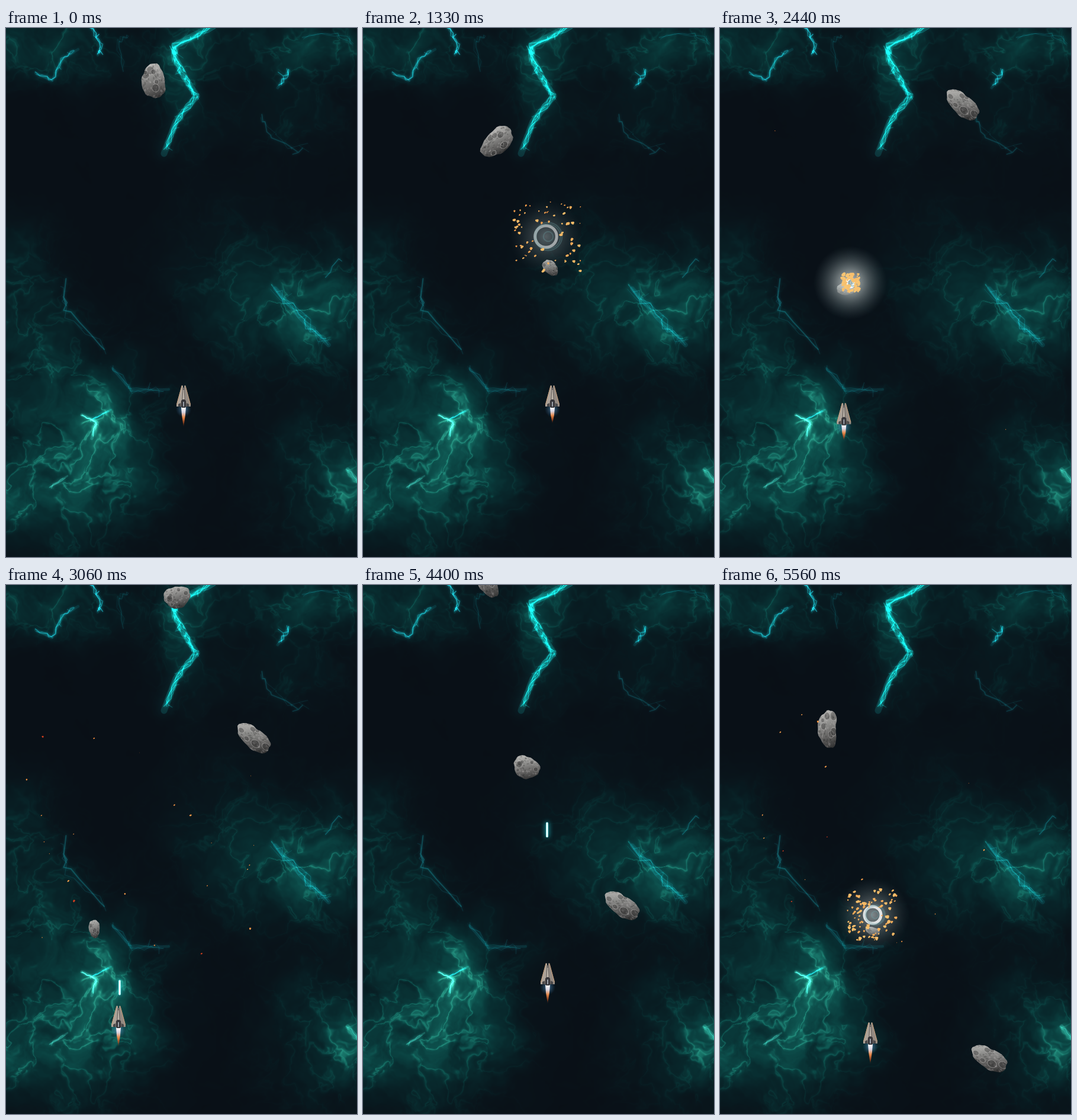
An HTML page with a canvas that plays this animation: 593 by 893 pixels, repeating every 5.59 s.

```html
<!DOCTYPE html>
<html lang="en">
<head>
<meta charset="utf-8">
<title>Asteroid shooter</title>
<style>
html, body { margin: 0; width: 100%; height: 100%; overflow: hidden; background: #09111a; }
canvas { display: block; }
</style>
</head>
<body>
<canvas id="stage" width="593" height="893"></canvas>
<script>
const W = 593, H = 893, LOOP = 5590, TAU = Math.PI * 2;
const stage = document.getElementById('stage');
const ctx = stage.getContext('2d');
const clamp = (v, lo, hi) => Math.min(hi, Math.max(lo, v));
const mix = (a, b, k) => a + (b - a) * k;

function random(seed) {
  return () => {
    seed = (seed + 0x6D2B79F5) | 0;
    let t = Math.imul(seed ^ (seed >>> 15), 1 | seed);
    t = (t + Math.imul(t ^ (t >>> 7), 61 | t)) ^ t;
    return ((t ^ (t >>> 14)) >>> 0) / 4294967296;
  };
}

// ---------- Nebula ----------
const lattice = Float32Array.from({ length: 65536 }, random(11));

function noise(x, y) {
  const xi = Math.floor(x), yi = Math.floor(y);
  let u = x - xi, v = y - yi;
  u *= u * (3 - 2 * u);
  v *= v * (3 - 2 * v);
  const x0 = xi & 255, x1 = (xi + 1) & 255, y0 = (yi & 255) << 8, y1 = ((yi + 1) & 255) << 8;
  return mix(mix(lattice[y0 + x0], lattice[y0 + x1], u), mix(lattice[y1 + x0], lattice[y1 + x1], u), v);
}

function fbm(x, y, octaves) {
  let sum = 0, amp = 0.5;
  for (let i = 0; i < octaves; i++, amp /= 2) {
    sum += amp * noise(x, y);
    x = x * 2.03 + 17;
    y = y * 2.03 + 31;
  }
  return sum;
}

// x, y, radius x, radius y, strength
const clouds = [
  [50, 25, 115, 48, .34], [300, 70, 42, 95, .26], [520, 25, 110, 48, .32],
  [480, 150, 75, 55, .12], [510, 485, 85, 65, .35], [565, 425, 65, 70, .15],
  [390, 430, 85, 95, .18], [15, 440, 60, 75, .23], [60, 560, 95, 65, .24],
  [150, 650, 95, 60, .32], [60, 770, 115, 85, .42], [0, 815, 35, 40, .26],
  [180, 750, 60, 75, .2], [585, 775, 32, 50, .36], [530, 760, 80, 110, .2]
];

function paintClouds(g) {
  const img = g.createImageData(W, H), px = img.data;
  for (let y = 0, p = 0; y < H; y++) {
    for (let x = 0; x < W; x++, p += 4) {
      const dx = fbm(x / 55, y / 55, 4) - .47, dy = fbm(x / 55 + 90, y / 55 + 40, 4) - .47;
      const wx = x + dx * 75, wy = y + dy * 75;
      let d = 0;
      for (const c of clouds) {
        const a = (wx - c[0]) / c[2], b = (wy - c[1]) / c[3], q = a * a + b * b;
        if (q < 6) d += c[4] * Math.exp(-q * .75);
      }
      const n = fbm(wx / 42 + 7, wy / 42 + 60, 5);
      const ridge = 1 - Math.abs(2 * fbm(wx / 38 + 120, wy / 38 + 9, 4) - .95);
      const v = d * (.35 + 1.15 * n + .8 * Math.pow(ridge, 14)) + .02 * n;
      px[p] = 9 - 6 * Math.min(v, .4) + 50 * v * v * v;
      px[p + 1] = 15 + 86 * v + 80 * v * v;
      px[p + 2] = 22 + 78 * v + 55 * v * v;
      px[p + 3] = 255;
    }
  }
  g.putImageData(img, 0, 0);
}

// A jagged thread through "x,y x,y ..." with short side branches
function bolt(g, path, strands, spread, color, alpha, glow) {
  const points = path.split(' ').map(p => p.split(',').map(Number));
  const rnd = random(points[0][0] * 7 + points[0][1]);
  const off = s => (rnd() - .5) * 2 * s;
  g.save();
  g.globalCompositeOperation = 'lighter';
  g.strokeStyle = g.shadowColor = color;
  g.lineCap = g.lineJoin = 'round';
  if (glow) {
    g.globalAlpha = .16;
    g.shadowBlur = glow;
    g.lineWidth = glow * .55;
    g.beginPath();
    points.forEach(p => g.lineTo(p[0], p[1]));
    g.stroke();
  }
  g.shadowBlur = 4;
  for (let k = 0; k < strands; k++) {
    g.globalAlpha = alpha * (.4 + .6 * rnd());
    g.lineWidth = .5 + rnd() * (k ? .8 : 1.6);
    g.beginPath();
    for (let i = 1; i < points.length; i++) {
      const [ax, ay] = points[i - 1], [bx, by] = points[i];
      for (let s = 0; s < 5; s++) {
        const x = mix(ax, bx, s / 5) + off(spread), y = mix(ay, by, s / 5) + off(spread);
        g.lineTo(x, y);
        if (rnd() < .16) {
          g.lineTo(x + off(spread * 2.5), y + off(spread * 2));
          g.moveTo(x, y);
        }
      }
    }
    g.stroke();
  }
  g.restore();
}

function makeSky() {
  const c = document.createElement('canvas');
  c.width = W;
  c.height = H;
  const g = c.getContext('2d');
  paintClouds(g);
  const cyan = '#16b5ae', dim = '#11757c', pale = '#4bc4ac';
  bolt(g, '350,-4 285,30 285,50 301,82', 9, 5, cyan, .5, 22);
  bolt(g, '301,82 322,115 287,158 267,212', 9, 5, cyan, .42, 20);
  bolt(g, '50,76 78,89 95,52 122,36', 2, 3, dim, .8, 8);
  bolt(g, '143,-2 162,30 155,46', 2, 3, dim, .8, 7);
  bolt(g, '208,10 188,22 204,82', 2, 4, dim, .35, 0);
  bolt(g, '500,15 560,12 592,28', 2, 5, dim, .4, 0);
  bolt(g, '478,72 459,101', 3, 4, dim, .65, 9);
  bolt(g, '432,145 455,185 520,216', 2, 7, dim, .3, 0);
  bolt(g, '455,440 500,492 545,535', 4, 9, dim, .45, 14);
  bolt(g, '540,422 568,380', 2, 3, dim, .4, 0);
  bolt(g, '95,430 103,485 190,560', 2, 7, dim, .4, 0);
  bolt(g, '180,575 212,612 275,610', 3, 6, dim, .45, 8);
  bolt(g, '128,653 153,665 145,693', 3, 2, pale, .55, 9);
  bolt(g, '147,660 178,644', 2, 2, dim, .7, 5);
  bolt(g, '75,775 104,756', 2, 2, pale, .35, 5);
  bolt(g, '577,745 597,768', 2, 3, pale, .3, 12);
  return c;
}

// ---------- Actors ----------
// from time, to time, x, y, to x, to y, length, width, angle, turn
const rocks = [
  [0, 1150, 250, 90, 309, 352, 61, 43, 85, 90],
  [0, 2395, 238, -106, 217, 430, 66, 42, 16, -107],
  [1700, 5420, 400, -40, 457, 806, 68, 41, 45, -15],
  [2700, 4758, 292, -51, 271, 425, 47, 40, -20, 60],
  [4050, 5420, 216, -54, 183, 251, 66, 38, 70, 20],
  [1150, 1500, 309, 352, 324, 454, 32, 23, 0, 90],
  [2395, 3319, 217, 430, 115, 657, 32, 20, 0, 130],
  [3319, 4120, 108, 666, 68, 866, 13, 11, 0, 200],
  [4758, 5254, 265, 425, 258, 557, 32, 22, 0, 100],
  [5254, 5420, 258, 557, 258, 592, 26, 15, 0, 25]
];
// time, x, y, sparks, glow
const blasts = [
  [1150, 309, 352, 70, 1], [1500, 320, 454, 75, .6], [2395, 220, 430, 75, 1],
  [3319, 116, 655, 50, .4], [4758, 265, 425, 65, 1], [5254, 258, 557, 85, 1]
];
// launch time, x, start y, end y
const bullets = [
  [899, 302, 600, 365], [1353, 324, 600, 463], [2224, 222, 600, 440], [2966, 192, 717, -40],
  [3270, 120, 706, 662], [4001, 311, 645, -40], [4542, 273, 640, 438], [5111, 257, 700, 566]
];
// time, x, y
const shipPath = [
  [0, 300, 603], [1180, 300, 603], [1480, 340, 603], [1840, 340, 603], [2224, 222, 603],
  [2320, 215, 610], [2850, 190, 710], [3010, 190, 710], [3230, 120, 710], [3460, 120, 710],
  [3970, 312, 638], [4260, 312, 638], [4530, 273, 640], [5100, 257, 697], [5260, 254, 738],
  [5420, 254, 738]
];

function shipAt(t) {
  const i = shipPath.findIndex(row => row[0] > t);
  const a = shipPath[i - 1], b = shipPath[i], k = (t - a[0]) / (b[0] - a[0]);
  return [mix(a[1], b[1], k), mix(a[2], b[2], k)];
}

function drawRock([start, end, x0, y0, x1, y1, len, wid, deg, turn], id, t) {
  if (t < start || t >= end) return;
  const k = (t - start) / (end - start);
  const rnd = random(id * 97 + 5), s = rnd() * 6, bean = id === 2 || id === 4 ? .16 : .04;
  const a = (deg + turn * k) * Math.PI / 180;
  ctx.save();
  ctx.translate(mix(x0, x1, k), mix(y0, y1, k));
  ctx.rotate(a);
  ctx.scale(len / 2, wid / 2);
  ctx.beginPath();
  for (let i = 0; i < 36; i++) {
    const q = i / 36 * TAU;
    const r = .96 + .05 * Math.sin(3 * q + s) + .025 * Math.sin(7 * q + s * 2)
      + .02 * Math.sin(11 * q) - bean * Math.max(0, -Math.sin(q)) ** 4 * 2;
    ctx.lineTo(r * Math.cos(q), r * Math.sin(q));
  }
  ctx.closePath();
  // Screen-fixed light from above
  const lx = -.25 * Math.cos(a) - .95 * Math.sin(a), ly = .25 * Math.sin(a) - .95 * Math.cos(a);
  const light = ctx.createLinearGradient(lx, ly, -lx, -ly);
  ['#b9b8b5', '#90908e', '#656463', '#343434'].forEach((c, i) => light.addColorStop(i / 3, c));
  ctx.fillStyle = light;
  ctx.fill();
  ctx.clip();
  for (let i = 0; i < len * 2.2; i++) {
    ctx.fillStyle = rnd() < .5 ? 'rgba(25,25,25,.22)' : 'rgba(225,223,218,.18)';
    ctx.beginPath();
    ctx.ellipse(rnd() * 2 - 1, rnd() * 2 - 1, .02 + rnd() * .09, .02 + rnd() * .07, rnd() * 3, 0, TAU);
    ctx.fill();
  }
  for (let i = 0; i < 6; i++) {
    const cx = rnd() * 1.5 - .75, cy = rnd() * 1.3 - .65, r = .08 + rnd() * .17;
    ctx.fillStyle = 'rgba(45,45,45,.38)';
    ctx.beginPath();
    ctx.ellipse(cx, cy, r, r * 1.2, 0, 0, TAU);
    ctx.fill();
    ctx.strokeStyle = 'rgba(205,203,200,.45)';
    ctx.lineWidth = .035;
    ctx.stroke();
  }
  ctx.restore();
}

function radial(x, y, r, colors) {
  const g = ctx.createRadialGradient(x, y, 0, x, y, r);
  colors.forEach((c, i) => g.addColorStop([0, .35, 1][i], c));
  ctx.fillStyle = g;
  ctx.fillRect(x - r, y - r, 2 * r, 2 * r);
}

function ring(x, y, r, width, color) {
  ctx.strokeStyle = color;
  ctx.lineWidth = width;
  ctx.beginPath();
  ctx.arc(x, y, r, 0, TAU);
  ctx.stroke();
}

function drawBlast([start, x, y, count, glow], id, t) {
  const age = t - start;
  if (age < 0 || age > 1000) return;
  const flash = clamp(1 - age / 270, 0, 1) * glow;
  if (flash > 0) {
    radial(x, y, 62, [`rgba(235,240,240,${flash})`, `rgba(180,190,190,${flash * .7})`, 'rgba(80,100,105,0)']);
    ring(x, y, 3 + age * .085, 5, `rgba(255,255,255,${Math.min(1, flash * 1.6)})`);
  }
  const fade = clamp(1 - age / 480, 0, 1), r = age * .13;
  for (const part of [1, .88, .35]) ring(x + 4, y, r * part, 2, `rgba(110,165,170,${fade * .45})`);
  const rnd = random(id * 131 + 3);
  for (let i = 0; i < count; i++) {
    let vx, vy;
    do {
      vx = rnd() * 2 - 1;
      vy = rnd() * 2 - 1;
    } while (vx * vx + vy * vy < .12);
    const life = 250 + 750 * rnd() ** 2, big = 1.5 + rnd() * 2.3, spin = rnd() * 6, red = rnd() < .12;
    const left = 1 - age / life;
    if (left <= 0) continue;
    const size = big * Math.sqrt(left), px = x + vx * age * .33, py = y + vy * age * .33;
    ctx.fillStyle = red && age > 200 ? '#d8401f' : `hsl(${24 + 14 * left},90%,${58 + 14 * left}%)`;
    ctx.beginPath();
    ctx.ellipse(px, py, size, size * .65, spin + age / 150, 0, TAU);
    ctx.ellipse(px + size * .4, py - size * .3, size * .7, size * .6, 0, 0, TAU);
    ctx.fill();
  }
}

function drawBullet([start, x, from, to], t) {
  const y = from - (t - start) * .935;
  if (t < start || y < to) return;
  ctx.save();
  ctx.lineCap = 'round';
  ctx.shadowColor = '#22d6e0';
  ctx.shadowBlur = 9;
  ctx.strokeStyle = '#7feef0';
  ctx.lineWidth = 4;
  ctx.beginPath();
  ctx.moveTo(x, y - 11);
  ctx.lineTo(x, y + 11);
  ctx.stroke();
  ctx.shadowBlur = 0;
  ctx.strokeStyle = '#f4ffff';
  ctx.lineWidth = 2.4;
  ctx.stroke();
  ctx.restore();
}

function shape(color, path) {
  ctx.fillStyle = color;
  ctx.fill(new Path2D(path));
}

function drawShip([x, y], t) {
  ctx.save();
  ctx.translate(x, y);
  const tip = 68 + 4 * Math.sin(t / 37 + 1);
  radial(0, 41, 13, ['rgba(200,225,255,.8)', 'rgba(90,150,200,.4)', 'rgba(60,120,170,0)']);
  const fire = ctx.createLinearGradient(0, 37, 0, tip);
  ['#fff', '#d8d5e2', '#e88a4c', 'rgba(178,78,32,.8)', 'rgba(90,35,15,0)']
    .forEach((c, i) => fire.addColorStop(i / 4, c));
  shape(fire, `M-4 37H4L3 50L0 ${tip}L-3 50Z`);
  shape('#aca298', 'M-3 0L-1 1V36H-12V32Z');
  shape('#938a82', 'M3 0L1 1V36H12V32Z');
  shape('#6a6562', 'M-1.5 4H1.5L3.5 34H-3.5Z');
  shape('#beb5aa', 'M-.6 8H.6L1.6 25H-1.6Z');
  ctx.strokeStyle = '#c99d77';
  ctx.lineWidth = .9;
  ctx.stroke(new Path2D('M-3 1L-11.5 33M3 1L11.5 33'));
  shape('#4b494a', 'M-9 32L-5 30V36H-9ZM9 32L5 30V36H9Z');
  shape('#38373b', 'M-4 26L-1.5 24H1.5L4 26L4.5 35L3 38H-3L-4.5 35Z');
  shape('#9aa0a8', 'M-1 28H1V36H-1Z');
  ctx.restore();
}

const sky = makeSky();

// The action slows down in two stretches
const gameTime = t => t - .27 * clamp(t - 2860, 0, 560) - .06 * Math.max(0, t - 5140);

function draw(now) {
  const t = gameTime(now % LOOP);
  ctx.drawImage(sky, 0, 0);
  bullets.forEach(b => drawBullet(b, t));
  rocks.forEach((rock, id) => drawRock(rock, id, t));
  drawShip(shipAt(t), t);
  blasts.forEach((b, id) => drawBlast(b, id, t));
}

let begin;
function tick(now) {
  begin ??= now;
  draw(now - begin);
  requestAnimationFrame(tick);
}
draw(0);
requestAnimationFrame(tick);
</script>
</body>
</html>
```
